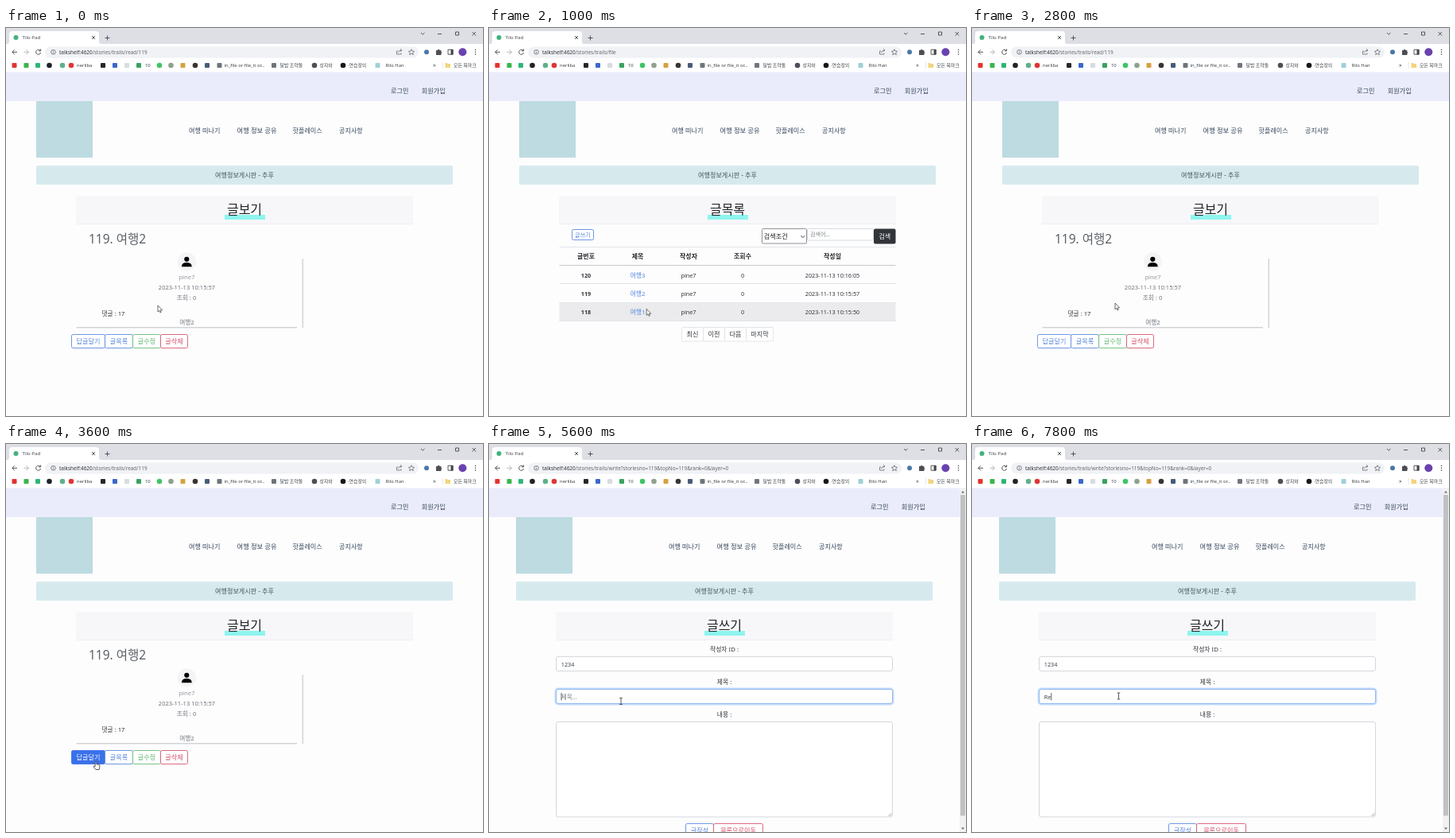
Animation, 600 px wide and 488 px high, one loop 8 s. Source, as an HTML page:

```html
<!DOCTYPE html>
<html lang="ko">
<head>
<meta charset="utf-8">
<title>Board demo</title>
<style>
html, body { margin: 0; width: 100%; height: 100%; overflow: hidden; background: #fdfdfe; }
svg { display: block; width: 600px; height: 488px; font-family: "Noto Sans", "Noto Sans CJK KR", sans-serif; }
text { white-space: pre; }
</style>
</head>
<body>
<svg id="stage" viewBox="0 0 600 488">
  <g id="chrome"></g>
  <g id="url"></g>
  <g id="page"></g>
  <g id="cursor"></g>
</svg>
<script>
const LOOP = 8000, STEP = 200;
const INK = '#33363b', SLATE = '#34465a', GREY = '#70767d', BLUE = '#5585dd', GREEN = '#62b870', RED = '#d6506a';
const $ = id => document.getElementById(id);

// Drawing helpers
const text = (x, y, s, size = 8.1, fill = INK, anchor = 'start', weight = 400) =>
  `<text x="${x}" y="${y}" font-size="${size}" fill="${fill}" text-anchor="${anchor}" font-weight="${weight}">${s}</text>`;
const mid = (x, y, s, size, fill, weight) => text(x, y, s, size, fill, 'middle', weight);
const rect = (x, y, w, h, fill, stroke = 'none', r = 0, sw = 1) =>
  `<rect x="${x}" y="${y}" width="${w}" height="${h}" rx="${r}" fill="${fill}" stroke="${stroke}" stroke-width="${sw}"/>`;
const disc = (x, y, r, fill, stroke = 'none') =>
  `<circle cx="${x}" cy="${y}" r="${r}" fill="${fill}" stroke="${stroke}"/>`;
const line = (d, stroke = '#55585d', sw = 1, fill = 'none') =>
  `<path d="${d}" stroke="${stroke}" stroke-width="${sw}" fill="${fill}"/>`;
const button = (x, y, w, h, label, color, size = 8.1, on = false) =>
  rect(x + .5, y + .5, w - 1, h - 1, on ? '#3a70ea' : '#fff', on ? '#3a70ea' : color, 1.8, .85) +
  mid(x + w / 2, y + h / 2 + size * .36, label, size, on ? '#fff' : color);

function browser() {
  let s = rect(0, 0, 600, 20, '#dddfe5') + rect(0, 20, 600, 35.5, '#fff') +
    line('M2 20 Q4 20 4 17 V8 Q4 4 8 4 H113 Q117 4 117 8 V17 Q117 20 119 20Z', 'none', 0, '#fff') +
    disc(12.5, 12, 3, '#43b27f') + text(20.5, 14.3, 'Tilo Pad', 6.1, '#45484d') +
    line('M108 10 l4 4 M112 10 l-4 4 M124.5 12.5 h6 M127.5 9.5 v6', '#44474c', .9) +
    line('M522 6 l2.2 2.2 2.2 -2.2 M543 7.5 h5 M565.5 5 h4 v4 h-4z M586.5 5 l4.5 4.5 M591 5 l-4.5 4.5', '#333', .8);
  s += line('M14 30.3 h-6 M10.8 27.3 l-3 3 3 3', '#505358') +
    line('M22.5 30.3 h6 M25.5 27.3 l3 3 -3 3', '#b4b7bb') +
    line('M43 28.4 a3 3 0 1 0 .6 2.6 M43.6 26.5 v2.4 h-2.4', '#505358') +
    rect(49, 23.5, 470, 14, '#f0f2f5', 'none', 7) +
    `<circle cx="59.5" cy="30.3" r="2.8" fill="none" stroke="#5d6166" stroke-width=".8"/>` +
    line('M59.5 30 v1.8 M59.5 28.4 v.8', '#5d6166', .8) +
    line('M493 29 h-1.5 v4 h5.5 v-1.5 M493.5 31 q.5 -3 4 -3 M496 26.3 l2 1.7 -2 1.7', '#66696e', .8) +
    line('M510 26.8 l1.1 2.3 2.5 .3 -1.9 1.7 .6 2.5 -2.3 -1.3 -2.3 1.3 .6 -2.5 -1.9 -1.7 2.5 -.3z', '#66696e', .8) +
    disc(529, 30.3, 3, '#4a78a8') +
    line('M541 28 h2 a1.2 1.2 0 0 1 2.4 0 h2 v2 a1.2 1.2 0 0 1 0 2.2 v1.8 h-6.4z', 'none', 0, '#4c4f54') +
    line('M556 27.2 h6 v6 h-6z', '#44474c', .9) + rect(559.5, 27, 3, 6.5, '#44474c') +
    disc(574.3, 30.3, 5, '#6a42b0');
  for (const y of [27.5, 30.3, 33.1]) s += disc(590.5, y, .8, '#505358');

  // Bookmarks: plain marks in each site's colour
  const squares = [[10.5, '#e6322e'], [25.5, '#3cb44c'], [40, '#2fb673'], [122, '#25272b'], [137, '#3a69c8'],
    [152, '#d9dbde'], [167, '#3aa25f'], [222.5, '#d6a140'], [253, '#485b78'], [268.5, '#70757c'], [337, '#70757c'], [467.5, '#9ed0d8']];
  const discs = [[54.5, '#202327'], [71, '#5fb089'], [82, '#df3636'], [193, '#3ec467'], [207.5, '#91a08e'],
    [238, '#3a3431'], [388, '#4d5157'], [424, '#17191c']];
  for (const [x, c] of squares) s += rect(x - 3, 44, 6, 6, c, 'none', 1);
  for (const [x, c] of discs) s += disc(x, 47, 3.3, c);
  const labels = [[89, 'nerliba'], [175, '10'], [274.5, 'in_file or file_it or...'], [344.5, '달밤 조약돌'],
    [394.5, '상자와'], [430, '·연습장의'], [477.5, 'Rilo Han'], [563, '모든 북마크']];
  for (const [x, t] of labels) s += text(x, 49.3, t, 5.9, '#3c4045');
  return s + text(537, 49.3, '»', 7, '#3c4045') + line('M549.5 43 v8', '#d5d8dc', .6) +
    line('M552.5 44 h2.5 l1 1 h3 v5 h-6.5z', 'none', 0, '#f4d47c');
}

const HOST = 'talkshelf:4620';
const PATHS = {
  view: '/stories/trails/read/119',
  list: '/stories/trails/file',
  form: '/stories/trails/write?storiesno=119&amp;topNo=119&amp;rank=0&amp;layer=0'
};
const address = page =>
  text(67, 32.6, `${HOST}<tspan fill="#63676c">${PATHS[page]}</tspan>`, 6.38, '#303338');

const frame = title =>
  text(484, 82, '로그인', 8.1, SLATE) + text(522.8, 82, '회원가입', 8.1, SLATE) +
  rect(38, 92, 71, 71, '#bddbe0') +
  text(230, 131.5, '여행 떠나기', 8.1, SLATE) + text(290.5, 131.5, '여행 정보 공유', 8.3, SLATE) +
  text(360.5, 131.5, '핫플레이스', 8.1, SLATE) + text(419, 131.5, '공지사항', 8.1, SLATE) +
  rect(38, 173, 524, 24, '#d6eaed', 'none', 2) + mid(300, 187.8, '여행정보게시판 - 추후', 8.1, '#43565e') +
  rect(88, 211, 424, 36, '#f7f7fa', 'none', 2) + line('M88 246.5 H512', '#ededf1', .7) +
  rect(275, 235, 51, 6, '#8df5ee') + mid(300, 234, title, 16, '#222428');

const viewPage = st =>
  frame('글보기') + text(104, 271, '119. 여행2', 15.5, '#5d6268') +
  disc(227.3, 294, 11.5, '#f4f4f7') + disc(227.3, 290.8, 3.1, '#000') +
  line('M221 300.3 v-1.2 q.6 -4.1 6.3 -4.1 t6.3 4.1 v1.2z', 'none', 0, '#000') +
  mid(227.5, 315.5, 'pine7', 7.7, '#95999e') + mid(227.5, 328.6, '2023-11-13 10:15:57', 7.55, GREY) +
  mid(227, 341.6, '조회 : 0', 7.7, GREY) + text(120.5, 361.8, '댓글 : 17', 7.7) +
  mid(227.5, 373.2, '여행2', 7.7, GREY) +
  line('M88.5 376.8 H366 M373.2 290 V377.3', '#bfc0c3') +
  button(82, 385, 43, 18, '답글달기', BLUE, 8.1, st.hover === 'reply') +
  button(124, 385, 36, 18, '글목록', BLUE, 8.1, st.hover === 'list') +
  button(159, 385, 36, 18, '글수정', GREEN) +
  button(194, 385, 35, 18, '글삭제', RED);

function listPage(st) {
  const cols = [122, 187, 251, 319, 432];
  const rowY = i => Math.round(299 + i * 23.3) - .5;
  let s = frame('글목록') + button(104, 253, 28, 14, '글쓰기', BLUE, 7.2) +
    rect(343.5, 252.5, 56, 18.5, '#fff', '#85878a', 1, .9) + text(345.8, 265, '검색조건', 8.1, '#222') +
    line('M392.5 261.2 l2.3 2.3 2.3 -2.3', '#333', 1) +
    rect(400.5, 252.5, 83, 14.5, '#fff', '#cfd3d8', 1, .8) + text(404, 262.3, '검색어...', 7, '#7d8288') +
    rect(484, 252.5, 27.5, 19, '#313439', 'none', 2) + mid(497.7, 265, '검색', 8.1, '#fff') +
    line('M88.5 275.5 H511.5', '#dfe1e5', .9);
  ['글번호', '제목', '작성자', '조회수', '작성일'].forEach((t, i) => s += mid(cols[i], 290, t, 7.9, '#26292d', 700));
  const times = ['10:16:05', '10:15:57', '10:15:50'];
  times.forEach((time, i) => {
    const y = rowY(i), end = rowY(i + 1), no = 120 - i;
    if (st.hover === no) s += rect(88.5, y, 423, end - y, '#ebebed');
    ['' + no, '여행' + (3 - i), 'pine7', '0', '2023-11-13 ' + time].forEach((t, c) =>
      s += mid(cols[c], 313.6 + i * 23.3, t, c === 1 ? 7.8 : 7.25, c === 1 ? BLUE : INK, c ? 400 : 700));
    s += line(`M88.5 ${end} H511.5`, '#dfe1e5', .9);
  });
  s += line('M88.5 298.5 H511.5', '#bfc1c5', .9);
  [[242.5, 27, '최신'], [269.5, 27, '이전'], [296.5, 27, '다음'], [323.5, 34, '마지막']].forEach(([x, w, t]) =>
    s += rect(x, 376.5, w, 17.5, '#fff', '#dee2e6', 1, .9) + mid(x + w / 2, 388, t, 8.1, INK));
  return s;
}

function field(y, value, hint, active, caret) {
  let s = active ? rect(87.7, y - .8, 424.6, 19.6, '#fff', '#c5dcfb', 3.5, 2.4) : '';
  s += rect(88.5, y, 423, 18, '#fff', active ? '#88b3f0' : '#ced3d9', 2.5, .9);
  s += value ? text(94.8, y + 12.8, value, 7.2, '#3f4348') : text(94.8, y + 12.6, hint, 7.6, '#777c82');
  if (caret) {
    const w = { '': 0, R: 4.6, Re: 8.8 }[value] ?? value.length * 4.12;
    s += line(`M${95 + w} ${y + 4.5} v9.5`, '#222', .7);
  }
  return s;
}

const formPage = st =>
  `<g transform="translate(-4 0)">${frame('글쓰기')}` +
  mid(300, 261, '작성자 ID :', 7.8) + field(267.5, st.id, '작성자ID...', st.focus === 'id', st.focus === 'id') +
  mid(300, 301.8, '제목 :', 7.8) + field(308.5, st.title, '제목...', st.focus === 'title', st.focus === 'title' && st.blink) +
  mid(300, 342.5, '내용 :', 7.8) + rect(88.5, 349.5, 423, 119.5, '#fff', '#ced3d9', 2.5, .9) +
  line('M506.5 468 l4 -4 M508.8 468 l1.7 -1.7', '#888', .7) +
  button(251, 477, 36, 18, '글작성', BLUE) + button(286, 477, 63, 18, '목록으로이동', RED) + '</g>' +
  rect(592, 55.5, 8, 433, '#f1f1f2') + rect(593, 64, 6, 403.5, '#c0c1c3') +
  line('M594 61.5 l2 -2.5 2 2.5z M594 482.5 l2 2.5 2 -2.5z', 'none', 0, '#66696d');

const pages = { view: viewPage, list: listPage, form: formPage };

const shapes = {
  arrow: line('M0 0 V8 L1.8 6.4 L3 9 L4.2 8.4 L3.1 5.9 H5.6Z', '#333', .7, '#fff'),
  hand: line('M-.8 .8 Q0 -.6 .8 .8 V3.6 L4 4.4 Q5.2 4.8 5 6.2 L4.2 10.5 H-.2 L-3 6.8 Q-3 5.4 -.8 6.6Z', '#333', .8, '#fff'),
  beam: line('M-1.8 -4 H1.8 M0 -4 V4 M-1.8 4 H1.8', '#333', .8)
};

// Pointer path: time, x, y, shape from that time on
const path = [
  [0, 191, 349, 'arrow'], [200, 141, 393, 'hand'], [400, 150, 388, 'arrow'], [600, 198.5, 354, 'arrow'],
  [1200, 198, 353, 'arrow'], [1800, 196.5, 334, 'hand'], [2400, 196.5, 334, 'arrow'], [2800, 180, 346, 'arrow'],
  [3400, 113, 399, 'hand'], [4000, 113, 399, 'arrow'], [4200, 165, 310, 'beam'], [4400, 181.5, 279.5, 'beam'],
  [5000, 181, 279, 'beam'], [5400, 166, 323.5, 'beam'], [5800, 166, 323.5, 'beam'], [6600, 184.5, 317, 'beam'], [LOOP, 184.5, 317, 'beam']
];
function pointer(t) {
  const i = path.findIndex((p, n) => t >= p[0] && t < path[n + 1][0]);
  const a = path[i], b = path[i + 1], k = (t - a[0]) / (b[0] - a[0]);
  return `<g transform="translate(${a[1] + (b[1] - a[1]) * k} ${a[2] + (b[2] - a[2]) * k})">${shapes[a[3]]}</g>`;
}

function stateAt(t) {
  const page = t < 400 ? 'view' : t < 2400 ? 'list' : t < 4000 ? 'view' : 'form';
  const hover = t === 200 ? 'list' : page === 'list' ? (t < 600 ? 0 : t < 1600 ? 118 : 119) : t >= 3400 ? 'reply' : '';
  return {
    page, hover,
    id: '1234'.slice(0, Math.max(0, (t - 4600) / STEP)),
    title: t < 7400 ? '' : t < 7800 ? 'R' : 'Re',
    focus: t < 4600 ? '' : t < 5400 ? 'id' : 'title',
    blink: Math.floor((t - 5400) / 600) % 2 === 0
  };
}

function draw(t) {
  const st = stateAt(t);
  $('url').innerHTML = address(st.page);
  $('page').innerHTML = rect(0, 55.5, 600, 433, '#fdfdfe') + rect(0, 55.5, 600, 36.5, '#ebecfb') + pages[st.page](st);
  $('cursor').innerHTML = pointer(t);
}

$('chrome').innerHTML = browser();
const start = performance.now();
let shown = -1;
function tick() {
  const t = Math.floor((performance.now() - start) % LOOP / STEP) * STEP;
  if (t !== shown) draw(shown = t);
  requestAnimationFrame(tick);
}
tick();
</script>
</body>
</html>
```
